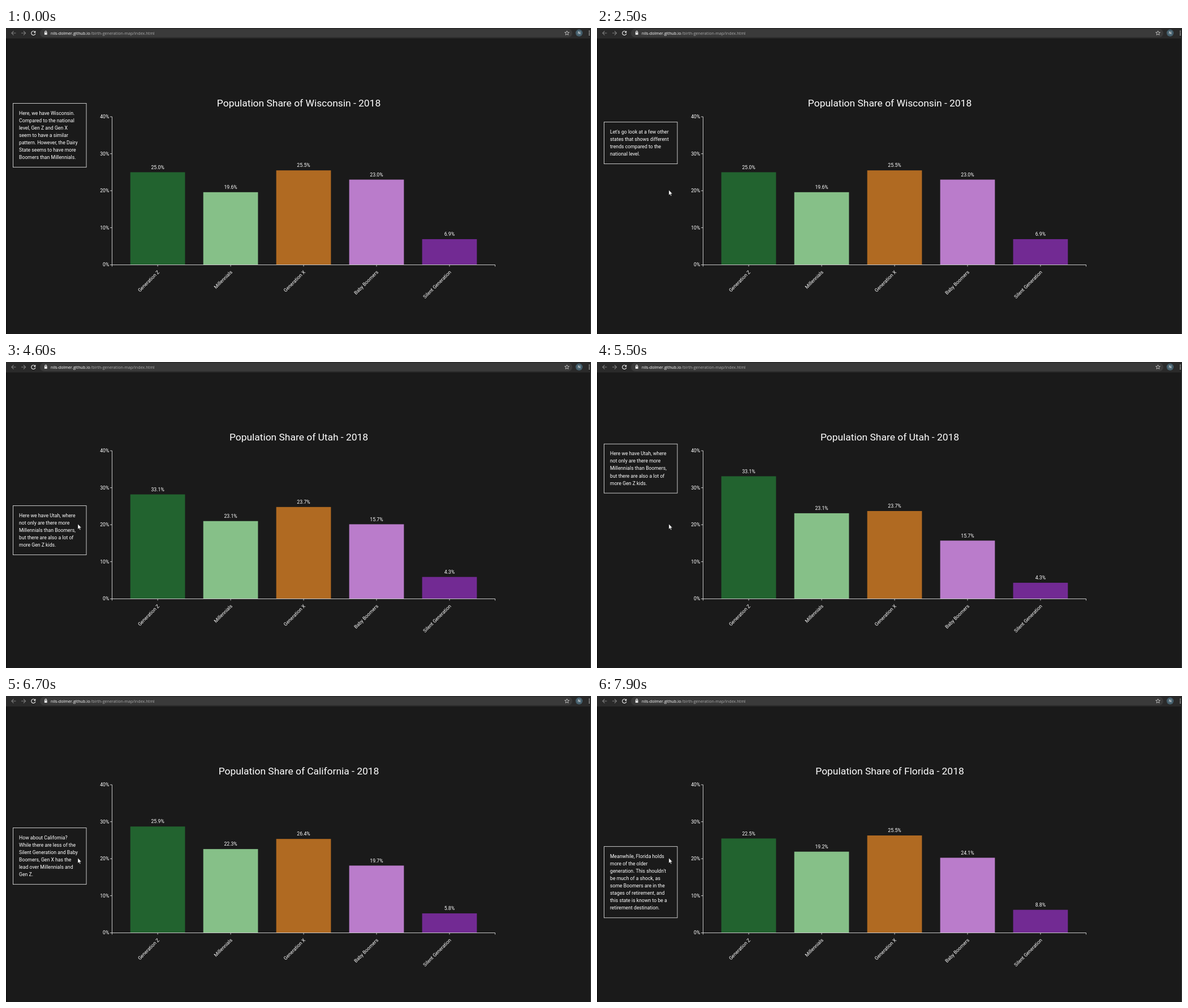
Write an HTML page that moves like this. It is 1034 px wide and 542 px high and loops after 8 s.

```html
<!DOCTYPE html>
<html lang="en">
<head>
<meta charset="utf-8">
<title>Population share by generation</title>
<style>
  html, body { margin: 0; width: 100%; height: 100%; overflow: hidden; background: #1a1a1a; }
  svg { display: block; width: 100%; height: 100%; }
  text { font: 8.71px Roboto, Arial, sans-serif; fill: #fff; }
  .title { font-size: 17.42px; text-anchor: middle; }
  .mid { text-anchor: middle; }
  .end { text-anchor: end; }
  .line { fill: none; stroke: #dcdcdc; stroke-width: .9; }
  .url { font: 7.2px "Open Sans", "Noto Sans", sans-serif; }
  .icon { fill: none; stroke-width: 1.1; }
</style>
</head>
<body>
<svg viewBox="0 0 1034 542">
  <defs><clipPath id="view"><rect y="18.5" width="1034" height="523.5"/></clipPath></defs>
  <rect width="1034" height="542" fill="#1a1a1a"/>
  <rect y="18" width="1.5" height="524" fill="#0d0d0d"/>
  <rect x="1033" y="18" width="1" height="524" fill="#3c3c3c"/>

  <g id="toolbar">
    <rect width="1034" height="18.5" fill="#2a2a2a"/>
    <rect x="60" y="1.5" width="941" height="15" rx="7.5" fill="#3a3a3a"/>
    <path class="icon" stroke="#7d7d7d" d="M17.5 9H10M13.5 5.4L9.9 9l3.6 3.6M27 9h7.5M31 5.4L34.6 9 31 12.6"/>
    <path class="icon" stroke="#f0f0f0" d="M51.2 6.8A3.6 3.6 0 1 0 51.9 9.8"/>
    <path fill="#f0f0f0" d="M52.3 4.8v3.6h-3.6z"/>
    <path class="icon" stroke="#e0e0e0" d="M68.8 8V6.9a1.5 1.5 0 0 1 3 0V8"/>
    <rect x="67.9" y="7.8" width="4.8" height="4.2" rx=".5" fill="#e0e0e0"/>
    <text class="url" x="79" y="11.6">nils-dolmer.github.io</text>
    <text class="url" x="149.6" y="11.6" style="fill:#aaa">/birth-generation-map/index.html</text>
    <path class="icon" stroke="#d5d5d5" style="stroke-width:.8"
      d="M991.5 5l1.1 2.6 2.8.2-2.2 1.8.7 2.8-2.4-1.5-2.4 1.5.7-2.8-2.2-1.8 2.8-.2z"/>
    <circle cx="1013" cy="8.8" r="6.2" fill="#455f6c"/>
    <text class="mid" x="1013" y="11.2" style="font-size:6.6px">N</text>
    <g fill="#e0e0e0"><circle cx="1031" cy="5.6" r=".9"/><circle cx="1031" cy="8.9" r=".9"/><circle cx="1031" cy="12.2" r=".9"/></g>
  </g>

  <g id="chart"></g>
  <g clip-path="url(#view)"><g id="notes"></g></g>
  <path id="cursor" visibility="hidden" fill="#fff" stroke="#111" stroke-width=".5"
    d="M0 0V9.2L2.1 7.3 3.5 10.6 4.9 10 3.5 6.8H6.3Z"/>
</svg>

<script>
(() => {
  const LOOP = 8000, STEP = 100, GROW = 1500;
  const BASE = 419.2, UNIT = 6.55;          // chart floor and pixels per percent
  const LEFT = 187.5, RIGHT = 864.5;
  const BAND = (RIGHT - LEFT) / 5.25, BAR = BAND * .75;

  const groups = [
    ["Generation Z", "#22632f"], ["Millennials", "#86c088"], ["Generation X", "#b06a22"],
    ["Baby Boomers", "#ba7ccb"], ["Silent Generation", "#722a93"]
  ];
  // text: when title and labels switch; grow: when the bars start moving
  const states = [
    { name: "Wisconsin",  text: 0,    grow: -GROW, share: [25.0, 19.6, 25.5, 23.0, 6.9] },
    { name: "Utah",       text: 3900, grow: 3907,  share: [33.1, 23.1, 23.7, 15.7, 4.3] },
    { name: "California", text: 5800, grow: 5890,  share: [25.9, 22.3, 26.4, 19.7, 5.8] },
    { name: "Florida",    text: 7400, grow: 7425,  share: [22.5, 19.2, 25.5, 24.1, 8.8] }
  ];
  const notes = [
    ["Here, we have Wisconsin.", "Compared to the national", "level, Gen Z and Gen X", "seem to have a similar",
     "pattern. However, the Dairy", "State seems to have more", "Boomers than Millennials."],
    ["Let's go look at a few other", "states that shows different", "trends compared to the", "national level."],
    ["Here we have Utah, where", "not only are there more", "Millennials than Boomers,", "but there are also a lot of", "more Gen Z kids."],
    ["How about California?", "While there are less of the", "Silent Generation and Baby", "Boomers, Gen X has the",
     "lead over Millennials and", "Gen Z."],
    ["Meanwhile, Florida holds", "more of the older", "generation. This shouldn't", "be much of a shock, as",
     "some Boomers are in the", "stages of retirement, and", "this state is known to be a", "retirement destination."]
  ];

  // [time, value...] tracks
  const scrolled = [
    [1100, 0], [1400, 163.5], [1700, 163.5], [2000, 327], [2300, 327], [2500, 490.5],
    [3300, 490.5], [3500, 599.5], [3600, 599.5], [3700, 654], [3800, 654], [3900, 738], [4000, 763],
    [4400, 763], [4600, 887], [4700, 914.5], [5400, 914.5], [5800, 1242], [6000, 1242], [6200, 1296.5],
    [6400, 1405.5], [6800, 1405.5], [7000, 1514.5], [7200, 1514.5], [7400, 1745], [7600, 1855], [7700, 1883]
  ];
  const pointer = [
    [100, 15, 1], [200, 38, 62], [300, 64, 126], [400, 90, 190], [500, 110, 242],
    [600, 122, 276], [700, 126.5, 288.5], [1700, 126.5, 288.5], [1800, 127, 287]
  ];

  const $ = id => document.getElementById(id);

  function add(parent, tag, attrs, text) {
    const el = document.createElementNS("http://www.w3.org/2000/svg", tag);
    for (const key in attrs) el.setAttribute(key, attrs[key]);
    if (text) el.textContent = text;
    parent.appendChild(el);
    return el;
  }

  function sample(track, t) {
    const next = track.findIndex(k => k[0] > t);
    if (next === 0) return track[0].slice(1);
    if (next < 0) return track[track.length - 1].slice(1);
    const a = track[next - 1], b = track[next], p = (t - a[0]) / (b[0] - a[0]);
    return a.slice(1).map((v, i) => v + (b[i + 1] - v) * p);
  }

  function cubicInOut(p) {
    p = Math.min(1, Math.max(0, p));
    return p < .5 ? 4 * p ** 3 : 1 - 4 * (1 - p) ** 3;
  }

  const chart = $("chart");
  const title = add(chart, "text", { class: "title", x: 517.5, y: 139.3 });
  const bars = groups.map(([name, fill], i) => {
    const x = LEFT + BAND * (i + .25), mid = x + BAR / 2;
    const rect = add(chart, "rect", { x, width: BAR, fill });
    const label = add(chart, "text", { class: "mid", x: mid });
    add(chart, "path", { class: "line", d: `M${mid} 419.5v3` });
    add(chart, "text", { class: "end", transform: `translate(${mid + 3.6} 433) rotate(-45)` }, name);
    return { rect, label };
  });
  add(chart, "path", { class: "line", d: `M${LEFT - 3.5} 157.2H${LEFT}V419.5H${LEFT - 3.5}M${LEFT} 422.5v-3H${RIGHT}v3` });
  for (let v = 0; v <= 40; v += 10) {
    const y = BASE - v * UNIT;
    if (v % 40) add(chart, "path", { class: "line", d: `M${LEFT - 3.5} ${y}h3.5` });
    add(chart, "text", { class: "end", x: 182.3, y: y + 3 }, v + "%");
  }

  let noteTop = 133.5;
  for (const lines of notes) {
    const height = lines.length * 13.06 + 21.7;
    const box = add($("notes"), "g", { transform: `translate(12.5 ${noteTop})` });
    add(box, "rect", { class: "line", width: 129.5, height });
    lines.forEach((line, i) => add(box, "text", { x: 10.5, y: 20.2 + i * 13.06 }, line));
    noteTop += height + 410.5;
  }

  function draw(t) {
    const shown = states.filter(s => s.text <= t).length - 1;
    const now = states[shown], before = states[Math.max(0, shown - 1)];
    const p = cubicInOut((t - now.grow) / GROW);

    title.textContent = `Population Share of ${now.name} - 2018`;
    bars.forEach(({ rect, label }, i) => {
      const height = (before.share[i] + (now.share[i] - before.share[i]) * p) * UNIT;
      rect.setAttribute("y", BASE - height);
      rect.setAttribute("height", height);
      label.setAttribute("y", BASE - height - 5.8);
      label.textContent = now.share[i].toFixed(1) + "%";
    });

    $("notes").setAttribute("transform", `translate(0 ${-sample(scrolled, t)[0]})`);
    const [x, y] = sample(pointer, t);
    $("cursor").setAttribute("transform", `translate(${x} ${y})`);
    $("cursor").setAttribute("visibility", t < 100 ? "hidden" : "visible");
  }

  // the picture advances ten times a second
  const start = performance.now();
  function tick() {
    const t = Math.max(0, performance.now() - start) % LOOP;
    draw(Math.floor(t / STEP) * STEP);
    requestAnimationFrame(tick);
  }
  tick();
})();
</script>
</body>
</html>
```
